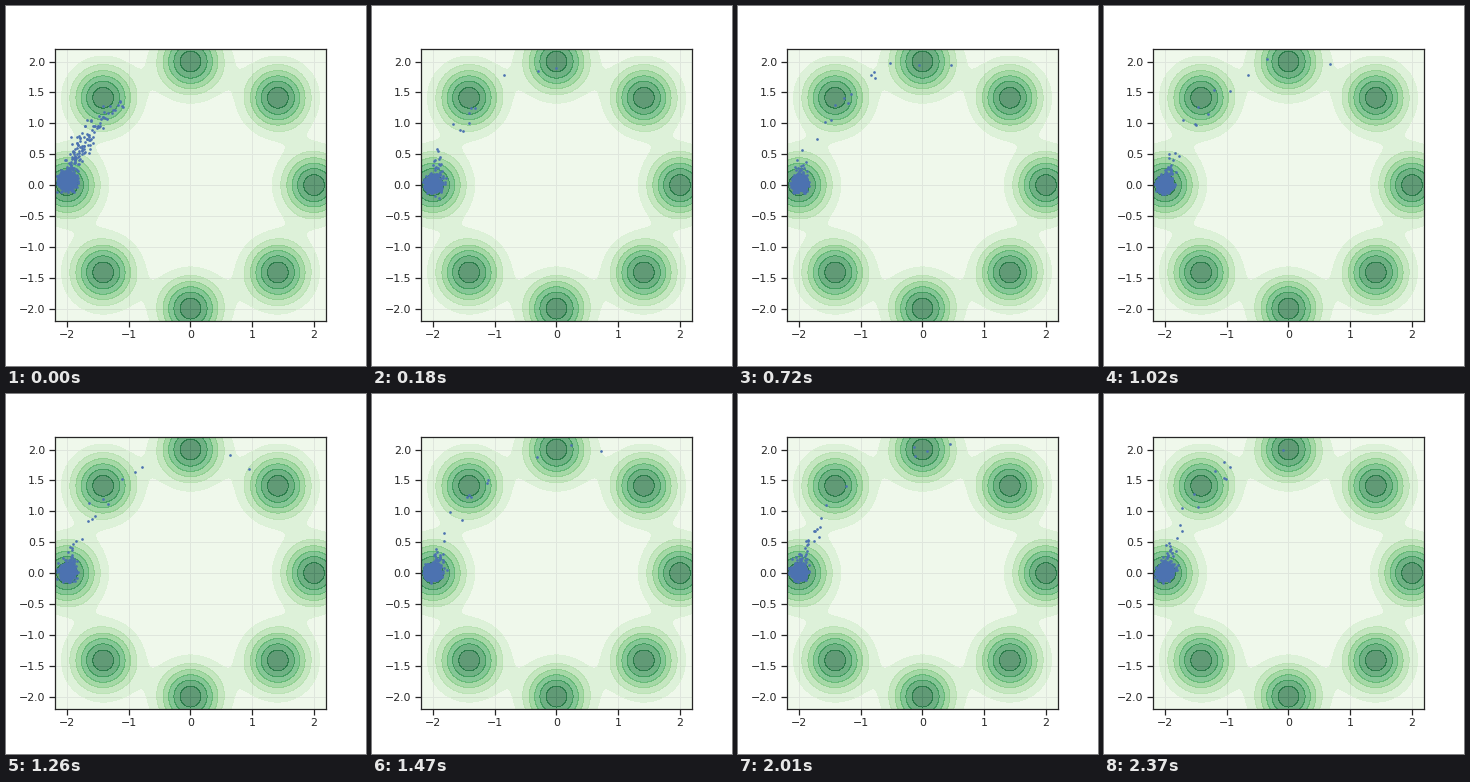
Animation, 360 px wide and 360 px high, one loop 2400 ms. Source, as a matplotlib script:

```python
import numpy as np
import matplotlib.pyplot as plt
from matplotlib.animation import FuncAnimation

STAGE, DPI = 360, 72
STEPS, STEP_MS = 80, 30
LIMIT = 2.2
LEFT, BOTTOM, SIDE = 48.6, 45.0, 271.8      # axes box in pixels
MODES, RING = 8, 2.0
PEAK, WIDTH = 6.76, 0.238                   # mode height in levels, 2 sigma^2
INK = "0.15"
BLUE = "#4c72b0"

plt.rcParams.update({"font.family": "DejaVu Sans", "font.size": 11})


def density(x, y):
    total = np.zeros_like(x)
    for a in np.arange(MODES) * 2 * np.pi / MODES:
        d2 = (x - RING * np.cos(a)) ** 2 + (y - RING * np.sin(a)) ** 2
        total += PEAK * np.exp(-d2 / WIDTH)
    return total


def on_ring(angle, radius):
    """Points measured clockwise from the left-hand mode."""
    return np.column_stack([-radius * np.cos(angle), radius * np.sin(angle)])


def samples(step):
    rng = np.random.default_rng(100 + step)
    early = np.exp(-step / 1.5)             # wide first tail, soon gone

    core = rng.normal((-RING, 0.02 + 0.05 * early), 0.055 + 0.01 * early,
                      (900, 2))
    near = np.minimum(0.06 + rng.exponential(0.06, 30), 0.28)
    tail = 0.95 * rng.beta(1, 2, int(150 * early))
    far = 0.25 + 2 * rng.beta(0.8, 1.8, int((1 - early) * rng.integers(10, 15)))

    return np.vstack([
        core,
        on_ring(near, rng.normal(1.95, 0.055, near.size)),
        on_ring(tail, rng.normal(1.97 - 0.25 * tail, 0.07)),
        on_ring(far, rng.normal(1.83 + 0.065 * far ** 2, 0.09)),
    ])


fig = plt.figure(figsize=(STAGE / DPI, STAGE / DPI), dpi=DPI, facecolor="white")
ax = fig.add_axes([LEFT / STAGE, BOTTOM / STAGE, SIDE / STAGE, SIDE / STAGE],
                  facecolor="#f2f8f0")

span = np.linspace(-LIMIT, LIMIT, 200)
gx, gy = np.meshgrid(span, span)
ax.contourf(gx, gy, density(gx, gy), levels=np.arange(8), cmap="Greens",
            alpha=0.6)

ax.set_xlim(-LIMIT, LIMIT)
ax.set_ylim(-LIMIT, LIMIT)
ax.set_xticks(np.arange(-2, 3))
ax.set_yticks(np.arange(-2, 2.1, 0.5))
ax.tick_params(length=6, width=1.25, pad=3.5, color=INK, labelcolor=INK)
ax.set_axisbelow(True)
ax.grid(color="0.8", linewidth=1)
for spine in ax.spines.values():
    spine.set(color=INK, linewidth=1.25)

dots, = ax.plot([], [], "o", color=BLUE, ms=2.7, mew=0, zorder=2.2)


def draw(step):
    dots.set_data(*samples(step).T)
    return dots,


anim = FuncAnimation(fig, draw, frames=STEPS, interval=STEP_MS,
                     init_func=lambda: draw(0), repeat=True, repeat_delay=0)
plt.show()
```
